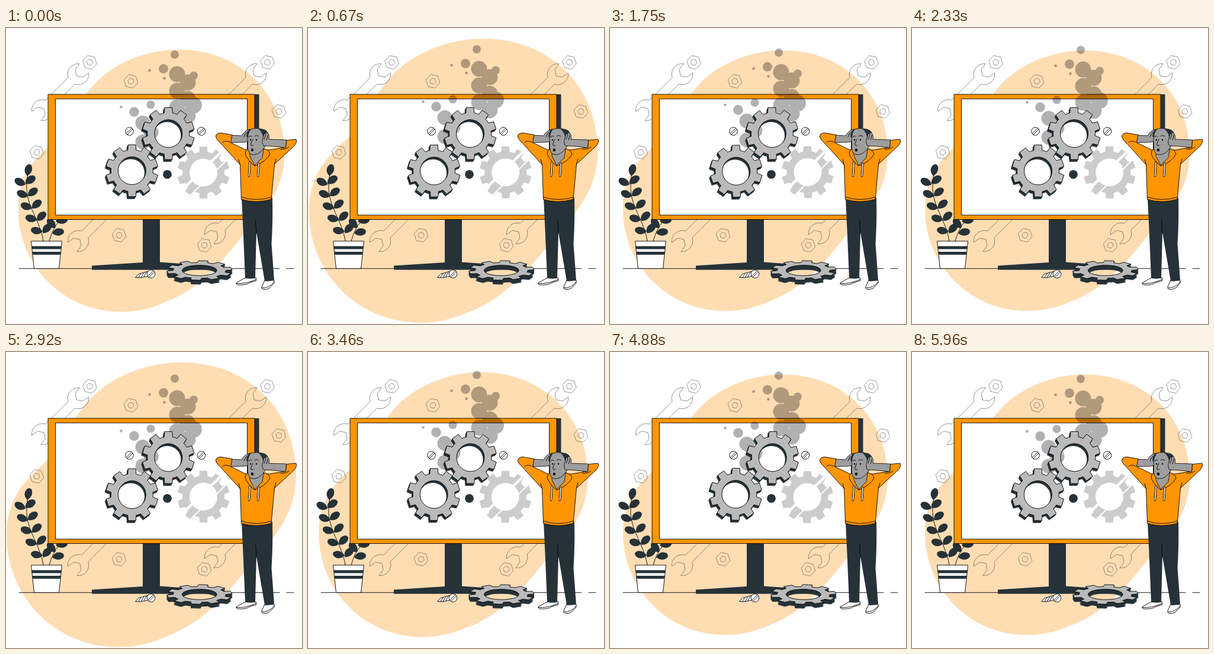
These frames come from a looping animation (500x500 px, 6000 ms). An HTML page:

```html
<!DOCTYPE html>
<html lang="en">
<head>
<meta charset="utf-8">
<title>Broken gears</title>
<style>
  html, body { margin: 0; width: 100%; height: 100%; overflow: hidden; background: #fff; }
  svg { display: block; width: 100%; height: 100%; }
  .line { fill: none; stroke: #000; stroke-width: .9; stroke-linecap: round; stroke-linejoin: round; }
  .thin { fill: none; stroke: #263238; stroke-width: .5; }
  .dark { fill: #263238; }
  .orange { fill: #ff9500; stroke: #000; stroke-width: .9; stroke-linejoin: round; }
  .skin { fill: #9e9e9e; stroke: #000; stroke-width: .8; stroke-linejoin: round; }
  .white { fill: #fff; stroke: #000; stroke-width: .9; stroke-linejoin: round; }
</style>
</head>
<body>
<svg viewBox="0 0 500 500">
  <path id="blob" fill="#ffddb3" d="M292 38C395 38 469 112 469 212C469 270 438 306 405 342C372 384 330 440 268 462Q232 478 195 478C95 478 22 398 22 306C22 250 48 222 80 194C112 162 118 132 148 98C180 62 235 38 292 38Z"/>
  <g id="tools" class="thin"></g>
  <path class="line" d="M22 406.3H462M474 406.3H486"/>

  <g id="plant" class="dark">
    <path class="line" d="M63 360C58 325 33 300 35 265Q35 252 38 243M73 360Q78 340 90 326"/>
  </g>
  <path class="white" d="M42.5 360H94.5L89.5 406.3H47.5Z"/>
  <path class="dark" d="M43.5 368.5H93.6L93 373.5H44ZM44.6 378H92.6L92 383H45Z"/>

  <path class="dark" d="M231 322H260V395.500L345 401.500V408.500H145V401.500L231 396Z"/>
  <rect class="dark" x="419" y="112" width="8.500" height="211"/>
  <rect class="orange" x="71" y="112" width="349" height="211.500"/>
  <rect class="white" x="83.500" y="119.800" width="324" height="196.200"/>

  <g id="smoke" opacity=".3"></g>
  <circle class="dark" cx="272.500" cy="247.300" r="7.400"/>
  <g id="gears"></g>
  <g id="fallen"></g>
  <path class="white" d="M240 411L224 415.500L218.500 421.500L227 421.800L241 419Z"/>
  <path class="line" d="M224 421L228 415M228.500 421L232.500 414M233 420L237 412.500"/>
  <g id="screws"></g>

  <g id="person">
    <path class="white" d="M404 422L389 430.500Q388 433.500 393 434Q406 434.500 412 430L422.500 427V422Z"/>
    <path class="white" d="M437 426L432 437Q431.500 441.500 436 441.500Q444 442 448 436L453 431V426Z"/>
    <path class="line" d="M389 431.500Q404 433 422 425M432 439Q444 440 453 429"/>
    <path class="dark" d="M398 287L400.500 340L404 422.500Q412 424.500 421 422.500L423 345L437 427.500Q445 428.500 453 426L448.500 365Q451 325 450 287Z"/>
    <path class="line" d="M423 346L421.500 325"/>

    <path class="skin" d="M379 181L398 182Q402 174 411 171L412 191L402 193L379 193.500Z"/>
    <path class="orange" d="M405 206L397 202L379.500 193.500L382 180.500L363 177.300Q354 177.500 354.500 184Q356 189 361 193L395.500 231L397.500 289.500Q422 297 448 289.500L453.500 230L487 199Q492 193 490 188L473.500 189.500L472.500 201.500L445 206Z"/>
    <path class="line" d="M397.500 285.500Q422 294 449 285.500M395.500 231L393 222M453.500 230L456 221M366 193Q371 189 378 193M478 201Q473 205 464 205"/>
    <path class="orange" d="M407 205Q402 210 406 217Q412 228 420 233Q439 226 446 213Q444 205 435 204Z"/>
    <path class="skin" d="M412 209V216L420 232L433 219L436 200L415 196Z"/>
    <path class="skin" d="M408 181Q407 170 422 169.500Q440 169 440 185Q440 199 434 205Q427 214 418 214Q409 214 408.500 203Z"/>
    <path class="dark" d="M426 170Q438 169 442 176L444 183L438 192L434 187Q435 178 426 170ZM411 171Q407 174 406 183L409 186Q409 176 415 170Z"/>
    <path class="skin" d="M473.500 189L444 188Q446 179 440 176Q438 180 436 178L434 186Q431 193 435 199L448 199.500L472.500 202Z"/>
    <path class="line" d="M436 188Q438 183 439 179M440 189Q442 185 442 181M402 184Q404 178 407 176"/>
    <path class="line" d="M410 184Q412 181 415 183M420 183Q423 180 427 183M417 188Q413 195 414 198Q416 200 418 198"/>
    <circle cx="413" cy="189" r="1.200"/><circle cx="423" cy="189" r="1.200"/>
    <ellipse cx="416" cy="206" rx="2.200" ry="2.600"/>
    <g stroke-linecap="round">
      <path id="strings" d="M412 227L410.500 250M427 229L425.500 250" stroke="#000" stroke-width="3.200"/>
      <use href="#strings" style="stroke:#fff"/>
      <path d="M412 227L410.500 250M427 229L425.500 250" stroke="#fff" stroke-width="1.700"/>
    </g>
  </g>
</svg>
<script>
const NS = 'http://www.w3.org/2000/svg';
const get = id => document.getElementById(id);
const times = (n, fn) => Array.from({ length: n }, (_, i) => fn(i));

function add(parent, tag, attrs) {
  const el = document.createElementNS(NS, tag);
  for (const key in attrs) el.setAttribute(key, attrs[key]);
  parent.appendChild(el);
  return el;
}

function gearPath(sx = 1, sy = 1, phase = -Math.PI / 2) {
  const outer = 44.3, inner = 35.5, hole = 23.5, teeth = 10;
  const at = (angle, r) => `${(Math.cos(angle) * r * sx).toFixed(2)} ${(Math.sin(angle) * r * sy).toFixed(2)}`;
  const arc = (r, sweep) => `A${r * sx} ${r * sy} 0 0 ${sweep} `;
  const rim = times(teeth, i => {
    const a = phase + i * 2 * Math.PI / teeth;
    return `${at(a - .2, inner)}L${at(a - .145, outer)}L${at(a + .145, outer)}L${at(a + .2, inner)}`;
  });
  return `M${rim.join(arc(inner, 1))}${arc(inner, 1)}${at(phase - .2, inner)}Z` +
    `M${at(0, hole)}${arc(hole, 0)}${at(Math.PI, hole)}${arc(hole, 0)}${at(0, hole)}Z`;
}

// Stacked dark copies give the gear its thickness.
function solidGear(parent, x, y, d, dx, dy) {
  for (let i = 1; i >= 0; i -= .25) {
    add(parent, 'path', {
      d, 'fill-rule': 'evenodd', fill: i ? '#263238' : '#bababa',
      stroke: i ? '#263238' : '#000', 'stroke-width': i ? .6 : .9,
      transform: `translate(${x + dx * i} ${y + dy * i})`
    });
  }
}

function wrench(x, y, angle) {
  const L = 86;
  add(get('tools'), 'path', {
    transform: `translate(${x} ${y}) rotate(${angle})`,
    d: `M14-11L2-9L-4 0L2 9L14 11A18 18 0 0 1-16 8H${16 - L}A18 18 0 0 1${-L - 14} 11` +
       `L${-L - 2} 9L${4 - L} 0L${-L - 2}-9L${-L - 14}-11A18 18 0 0 1${16 - L}-8H-16A18 18 0 0 1 14-11Z`
  });
}

function nut(x, y) {
  for (const r of [12, 5.2]) {
    const corners = times(6, i => {
      const a = i * Math.PI / 3 + .22;
      return `${x + r * Math.cos(a)},${y + r * Math.sin(a)}`;
    });
    add(get('tools'), 'polygon', { points: corners.join(' ') });
  }
}

function screw(x, y) {
  add(get('screws'), 'circle', { class: 'white', cx: x, cy: y, r: 6.8 });
  add(get('screws'), 'path', { class: 'line', d: `M${x - 5} ${y + 3.5}l9-9M${x - 3.5} ${y + 5.5}l9-9` });
}

function leaf(x, y, angle) {
  add(get('plant'), 'path', {
    d: 'M-10 0C-6-7 3-9 9-3Q11 0 9 3C3 8-5 6-10 0Z',
    transform: `translate(${x} ${y}) rotate(${angle})`
  });
}

const puff = (cx, cy, r) => add(get('smoke'), 'circle', { cx, cy, r });

// A column of overlapping puffs that swings left and right.
function plume(x, y, count, swing, step, r) {
  times(count, i => puff(x + (i % 2 ? swing : -swing), y + i * step, r));
}

for (const x of [122, 422]) {
  wrench(x, 78, -45);
  nut(x + 19.5, 58);
}
wrench(122, 360, 135);
wrench(353, 347, 135);
nut(335, 367);
nut(191, 350);
nut(211, 90);
nut(52, 210);
nut(461, 141);

screw(208.5, 174.5);
screw(330, 174.5);
screw(245, 415.5);

leaf(38, 240, -78);
times(5, i => {
  const x = 32.5 + 28 * (i / 4) ** 1.4, y = 260 + 20.5 * i;
  leaf(x - 8.5, y, -155 - 4 * i);
  leaf(x + 8.5, y - 3, -36 - 3 * i);
});
times(2, i => leaf(94 - 6 * i, 325 + 20 * i, -10));
leaf(77, 330, -130);

plume(298, 78.5, 6, 9, 14, 13.5);
plume(238, 161, 3, 7, 16, 12.5);
puff(317, 81, 7);
puff(317, 131, 14);
puff(285, 45.5, 7);
puff(266, 69.5, 8);
puff(244.5, 130, 7);
puff(216.5, 142.3, 8.3);
for (const [x, y] of [[242.5, 72.3], [267.5, 85.5], [194.5, 134]]) puff(x, y, 2.4);

const gears = get('gears'), upright = gearPath();
solidGear(gears, 274.3, 178.3, upright, -2, 3.6);
solidGear(gears, 212.8, 241, upright, -2, 3.6);
add(gears, 'path', { d: upright, 'fill-rule': 'evenodd', fill: '#ccc', transform: 'translate(333.5 244.3)' });
add(gears, 'path', { d: 'M298 273L362 211', stroke: '#fff', 'stroke-width': 4.5 });
add(gears, 'path', { d: 'M310 284L374 222', stroke: '#fff', 'stroke-width': 2 });
solidGear(get('fallen'), 326.8, 409.5, gearPath(1.25, .375, 1.69), 0, 7);

const LOOP = 6000, LEAD = 40;

// Linear interpolation through [position, value] pairs.
function track(keys, p) {
  const i = keys.findIndex(k => k[0] >= p);
  if (i < 1) return keys[0][1];
  const [p0, v0] = keys[i - 1], [p1, v1] = keys[i];
  return v0 + (v1 - v0) * (p - p0) / (p1 - p0);
}

const BEAT = [[0, 1], [.1, 1.1], [.3, 1], [.4, 1], [.5, 1.1], [.6, 1], [1, 1]];
const SWAY = [[0, 0], [.25, -1], [.75, 1], [1, 0]];
const FLOAT = [[0, 0], [.5, -10], [1, 0]];

function draw(ms) {
  const t = (ms + LEAD) % LOOP, p = t / LOOP;
  const sway = track(SWAY, p);
  get('blob').setAttribute('transform', `translate(245.5 258) scale(${track(BEAT, p)}) translate(-245.5 -258)`);
  get('smoke').setAttribute('transform', `translate(0 ${track(FLOAT, t % 1500 / 1500)})`);
  gears.setAttribute('transform', `rotate(${sway} 272.5 211)`);
  get('fallen').setAttribute('transform', `rotate(${sway * .6} 327 413)`);
}

const start = performance.now();
function frame() {
  draw(performance.now() - start);
  requestAnimationFrame(frame);
}
draw(0);
requestAnimationFrame(frame);
</script>
</body>
</html>
```
